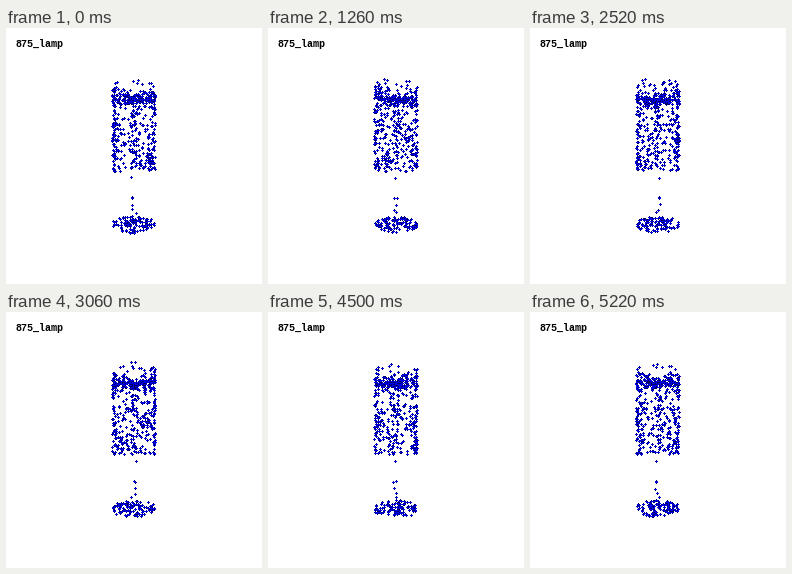
A matplotlib script that plays this animation: 256x256 px, repeating every 5.4 s.

```python
import numpy as np
import matplotlib.pyplot as plt
from matplotlib.animation import FuncAnimation
from matplotlib.collections import PolyCollection

SIZE, DPI = 256, 64
FRAMES, INTERVAL = 30, 180
CENTER, DEPTH = 128, 221.7   # screen centre, camera distance for a 60 degree view
RADIUS = 21
BLUE, DARK = (0, 0, 0.9), (0, 0, 0.4)

rng = np.random.default_rng(875)


def polar(radius, angle, height):
    """Points from cylinder coordinates; height grows downwards."""
    return np.column_stack(np.broadcast_arrays(
        radius * np.sin(angle), height, radius * np.cos(angle)))


def turn(n):
    return rng.uniform(0, 2 * np.pi, n)


def disc(n, height):
    return polar(RADIUS * np.sqrt(rng.random(n)), turn(n), height)


def tube(n, radius, top, bottom):
    return polar(radius, turn(n), rng.uniform(top, bottom, n))


def build_lamp():
    shade = tube(340, RADIUS, -70.5, 14.5)
    spokes = polar(RADIUS * rng.random(70),
                   np.pi / 2 + rng.integers(0, 3, 70) * 2 * np.pi / 3,
                   -56 + rng.normal(0, 0.9, 70))
    plate = disc(50, -56)
    collar = tube(25, RADIUS, -62, -52)
    pole = tube(30, 2.5, -55, 14)

    heights = np.array([22, 42, 42, 49, 54, 57, 61])
    angles = np.radians([255, 225, 330, 290, 220, 75, 240])
    stem = polar(2.1, angles, heights)

    base_top = disc(45, 66.5)
    base_rim = tube(25, RADIUS - 1, 66.5, 70)
    base_foot = disc(40, 70)
    return np.vstack([shade, spokes, plate, collar, pole, stem,
                      base_top, base_rim, base_foot])


LAMP = build_lamp()


def project(angle):
    x, y, z = LAMP.T
    c, s = np.cos(angle), np.sin(angle)
    x, z = c * x + s * z, c * z - s * x
    scale = DEPTH / (DEPTH - z)
    order = np.argsort(z)
    return (CENTER + np.column_stack([x, y]) * scale[:, None])[order]


def bars(pixel, width, height):
    """Rectangles centred on whole pixels."""
    corners = np.array([[-1, -1], [1, -1], [1, 1], [-1, 1]])
    return pixel[:, None, :] + 0.5 + corners * [width / 2, height / 2]


def dots(points):
    """Each point is a small plus: a dark upright bar under a blue level one."""
    pixel = np.floor(points)
    pairs = np.stack([bars(pixel, 1, 3), bars(pixel, 3, 1)], axis=1)
    return pairs.reshape(-1, 4, 2)


fig = plt.figure(figsize=(SIZE / DPI, SIZE / DPI), dpi=DPI, facecolor="white")
ax = fig.add_axes([0, 0, 1, 1])
ax.set(xlim=(0, SIZE), ylim=(SIZE, 0))
ax.axis("off")

ax.text(9, 19, "875_lamp", family="Liberation Mono", weight="bold",
        size=10 * 72 / DPI, color="black", va="baseline")

cloud = PolyCollection(dots(project(0)), facecolors=[DARK, BLUE],
                       edgecolors="none", linewidths=0, antialiaseds=False)
ax.add_collection(cloud, autolim=False)


def update(frame):
    cloud.set_verts(dots(project(2 * np.pi * frame / FRAMES)))
    return [cloud]


anim = FuncAnimation(fig, update, frames=FRAMES, interval=INTERVAL,
                     repeat=True, repeat_delay=0, blit=False)
plt.show()
```
